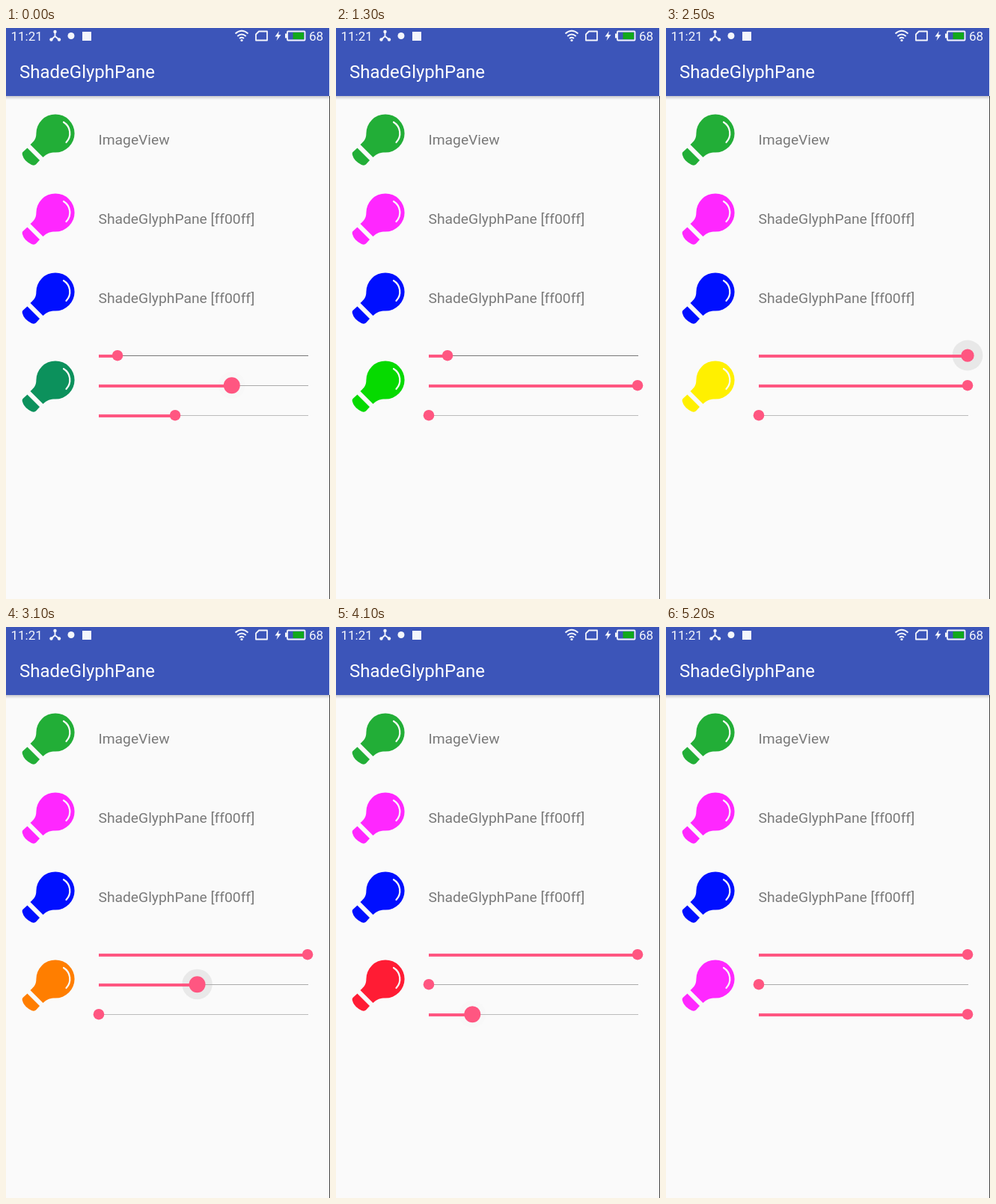
Recreate the animation shown at these times as an HTML page. Size 433x764 px, loop 6600 ms.

```html
<!DOCTYPE html>
<html lang="en">
<head>
<meta charset="utf-8">
<title>Tint sliders</title>
<style>
  html, body { margin: 0; width: 100%; height: 100%; overflow: hidden; background: #fafafa; }
  svg { display: block; width: 433px; height: 764px; font-family: Roboto, sans-serif; }
  .status { font-size: 17px; fill: #f4f6fc; }
  .title { font-size: 24px; fill: #fff; }
  .label { font-size: 19.25px; fill: #797979; }
  .icon { fill: #f4f6fc; }
  .line { fill: none; stroke: #f4f6fc; stroke-width: 1.8; }
  .accent { fill: #ff5681; }
</style>
</head>
<body>
<svg viewBox="0 0 433 764">
  <defs>
    <linearGradient id="shadow" x2="0" y2="1">
      <stop stop-color="#c9c9cc"/>
      <stop offset="1" stop-color="#fafafa"/>
    </linearGradient>
    <g id="bulb">
      <path d="M32.5 156C38 151 40.4 148 40.4 141A25.6 25.6 0 1 1 66 166.600C59 166.600 55 168 49.500 173Z"/>
      <path d="M28.5 160.5L45 177L40 182.500Q38 184.500 34 183Q24 178 22 170Q21 167 23 165.500Z"/>
      <path d="M77 126A17.500 17.500 0 0 1 80.500 153" fill="none" stroke="#fafafa" stroke-width="2.2" stroke-linecap="round"/>
    </g>
  </defs>

  <rect width="433" height="764" fill="#fafafa"/>
  <rect y="91" width="433" height="5" fill="url(#shadow)"/>
  <rect width="432" height="91" fill="#3c55b9"/>
  <rect x="432" y="91" width="1" height="673" fill="#444"/>

  <text class="status" x="6.5" y="16.5">11:21</text>
  <path class="line" d="M65.5 5V11L60 16M65.5 11L71.5 16"/>
  <g class="icon">
    <circle cx="65.5" cy="5" r="2.2"/>
    <circle cx="60.5" cy="15.5" r="2.2"/>
    <circle cx="71" cy="15.5" r="2.2"/>
    <circle cx="87" cy="10.5" r="4.5"/>
    <rect x="102" y="5" width="12" height="12"/>
    <circle cx="315" cy="16.5" r="1.6"/>
    <path d="M365 4L359.5 11.5H363L361.5 17L367.5 9H364Z"/>
    <rect x="373" y="7.5" width="2.5" height="6"/>
  </g>
  <path class="line" d="M306.500 7.500Q315 0 323.500 7.500M309.300 11Q315 6 320.700 11M312 14Q315 11.500 318 14"/>
  <path class="line" d="M338 4.500H349V16.500H334V8.500Z" stroke-linejoin="round"/>
  <rect class="line" x="376" y="4.5" width="23.5" height="12" rx="1"/>
  <rect x="383.5" y="6" width="14.5" height="9" fill="#12a81c"/>
  <text class="status" x="405" y="16.5">68</text>
  <text class="title" x="18" y="66.5">ShadeGlyphPane</text>

  <use href="#bulb" fill="#22ae37"/>
  <use href="#bulb" y="106" fill="#ff27ff"/>
  <use href="#bulb" y="212" fill="#000fff"/>
  <use href="#bulb" y="330" id="mixed"/>
  <text class="label" x="123.5" y="156">ImageView</text>
  <text class="label" x="123.5" y="262">ShadeGlyphPane [ff00ff]</text>
  <text class="label" x="123.5" y="368">ShadeGlyphPane [ff00ff]</text>
  <g id="sliders"></g>
</svg>

<script>
const LOOP = 6600, STEP = 100, LEFT = 124, TRACK = 279;

// Drag times are in steps. The halo fades on arrival, the thumb shrinks on lift.
const sliders = [
  { y: 438, line: '#777', drags: [
    { from: 25, to: TRACK, press: 13, arrive: 23, ease: 3.5, fade: 5 }] },
  { y: 478, line: '#aaa', drags: [
    { from: 144, to: TRACK, press: -1, arrive: 3, ease: 1, fade: 2 },
    { from: TRACK, to: 0, press: 28, arrive: 36, ease: 1.6, fade: 2 }] },
  { y: 518, line: '#bbb', drags: [
    { from: 102, to: 0, press: 6, arrive: 11, ease: .75, fade: 2 },
    { from: 0, to: TRACK, press: 40, arrive: 45, lift: 50, ease: 1.05, fade: 2 }] }
];

const clamp = (value, max = 1) => Math.max(0, Math.min(max, value));

function pose(drags, step) {
  const { from, to, press, arrive, lift = arrive, ease, fade } =
    drags.findLast(drag => drag.press <= step) || drags[0];
  const progress = clamp((step - press) / (arrive - press));
  const remaining = since => clamp(1 - (step - since) / fade);
  return {
    offset: from + (to - from) * (1 - (1 - progress) ** ease),
    growth: clamp(step - press) * remaining(lift) ** 2,
    halo: clamp((step - press) / 4) ** 2 * remaining(arrive)
  };
}

function screenColor([r, g, b]) {
  const channels = [
    1.086 * r - .072 * g - .014 * b,
    .097 * r + .845 * g + .058 * b,
    -.014 * r - .028 * g + 1.042 * b
  ];
  return `rgb(${channels.map(v => Math.round(clamp(v, 255)))})`;
}

function set(node, attributes) {
  for (const key in attributes) node.setAttribute(key, attributes[key]);
}

function add(parent, name, attributes) {
  const node = document.createElementNS(parent.namespaceURI, name);
  set(node, attributes);
  return parent.appendChild(node);
}

const group = document.getElementById('sliders');
const mixed = document.getElementById('mixed');
for (const s of sliders) {
  s.halo = add(group, 'circle', { cy: s.y, fill: '#000' });
  add(group, 'rect', { x: LEFT, y: s.y, width: TRACK + 1, height: 1, fill: s.line });
  s.bar = add(group, 'rect', { class: 'accent', x: LEFT, y: s.y - 1, height: 4 });
  s.thumb = add(group, 'circle', { class: 'accent', cy: s.y + .2 });
}

function draw(time) {
  const step = Math.floor(time % LOOP / STEP);
  const rgb = sliders.map(s => {
    const { offset, growth, halo } = pose(s.drags, step);
    const cx = LEFT + offset;
    set(s.halo, { cx, r: 18 + 4 * halo, 'fill-opacity': .12 * halo });
    set(s.bar, { width: offset });
    set(s.thumb, { cx, r: 7.3 + 3.7 * growth });
    return offset / TRACK * 255;
  });
  set(mixed, { fill: screenColor(rgb) });
}

const start = performance.now();
function tick() {
  draw(performance.now() - start);
  requestAnimationFrame(tick);
}
tick();
</script>
</body>
</html>
```
